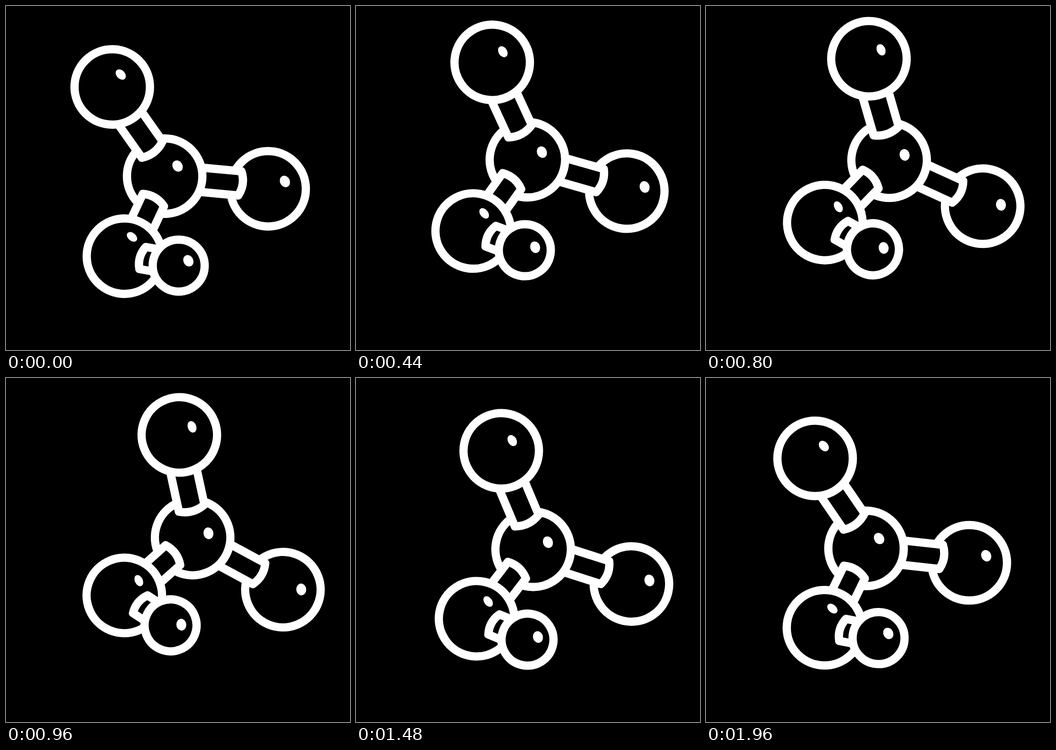
Animation, 748 px wide and 748 px high, one loop 2 s. Source, as an HTML page:

```html
<!DOCTYPE html>
<html lang="en">
<head>
<meta charset="utf-8">
<title>Molecule</title>
<style>
  html, body { margin: 0; width: 100%; height: 100%; overflow: hidden; background: #000; }
  svg { display: block; width: 100vw; height: 100vh; }
  .line { fill: #000; stroke: #fff; stroke-width: 18; stroke-linejoin: round; }
  .shine { fill: #fff; }
</style>
</head>
<body>
<svg viewBox="0 0 748 748"><g id="molecule"></g></svg>
<script>
const LOOP = 2000, STEP = 40, SWING = 24;
const BIG = 82, SMALL = 56.5, BOND = 100;
const molecule = document.getElementById('molecule');

function add(tag, attrs) {
  const node = document.createElementNS('http://www.w3.org/2000/svg', tag);
  for (const name in attrs) node.setAttribute(name, attrs[name]);
  molecule.append(node);
}

// The highlight sits at (dx, dy) from the centre and tilts with its direction.
function atom(x, y, r, dx, dy, thin = 10.7) {
  const tilt = 30 + Math.atan2(dx, -dy) * 90 / Math.PI;
  add('circle', { class: 'line', cx: x, cy: y, r });
  add('ellipse', {
    class: 'shine', rx: 12.8, ry: thin,
    transform: `translate(${x + dx} ${y + dy}) rotate(${tilt})`
  });
}

// A tube ending in a bulging cap centred at (x, y); lean turns its sides off the cap's axis.
function bond(x, y, width, angle, lean) {
  const half = width / 2, bulge = width * 0.24;
  const shift = BOND * Math.tan(lean * Math.PI / 180);
  add('path', {
    class: 'line',
    d: `M${-BOND} ${-half - shift}L0 ${-half}Q${bulge} 0 0 ${half}L${-BOND} ${half - shift}`,
    transform: `translate(${x} ${y}) rotate(${angle})`
  });
}

// Back to front
atom(570, 397.5, BIG, 36.5, -16);
bond(508.5, 385.7, 53, 7.6, -2.3);
atom(345, 370, BIG, 28, -22);
bond(318, 312, 57.6, 51.3, 3.4);
bond(320.5, 422, 53.3, -59.6, -5.4);
atom(231, 176, BIG, 18.5, -27, 9.3);
atom(257.5, 544, BIG, 16.5, -42, 8.6);
bond(297, 548, 50, 196.3, -6.3);
atom(375.5, 564.5, SMALL, 21, -10.5);

// Corners of the drift; each leg bows outward on its way to the next corner.
const corners = [
  { at: 0, x: 0, y: 0, bow: 2.25 },
  { at: 600, x: 37.8, y: -40, bow: 5.2 },
  { at: 1180, x: 61.6, y: 8.5, bow: 3.5 },
  { at: LOOP, x: 0, y: 0 }
];

function drift(t) {
  const next = corners.findIndex(corner => t < corner.at);
  const a = corners[next - 1], b = corners[next];
  const u = (t - a.at) / (b.at - a.at);
  const dx = b.x - a.x, dy = b.y - a.y;
  const side = 4 * u * (1 - u) * a.bow / Math.hypot(dx, dy);
  return [a.x + dx * u + dy * side, a.y + dy * u - dx * side];
}

function render(t) {
  const angle = SWING * (1 - Math.abs(1 - 2 * t / LOOP));
  const [x, y] = drift(t);
  molecule.setAttribute('transform', `translate(${x} ${y}) rotate(${angle} 374 374)`);
}

let origin;
function tick(now) {
  origin ??= now;
  // Small lead so that timer jitter does not hold back a step.
  render(Math.floor((now - origin + 8) / STEP) * STEP % LOOP);
  requestAnimationFrame(tick);
}
render(0);
requestAnimationFrame(tick);
</script>
</body>
</html>
```
